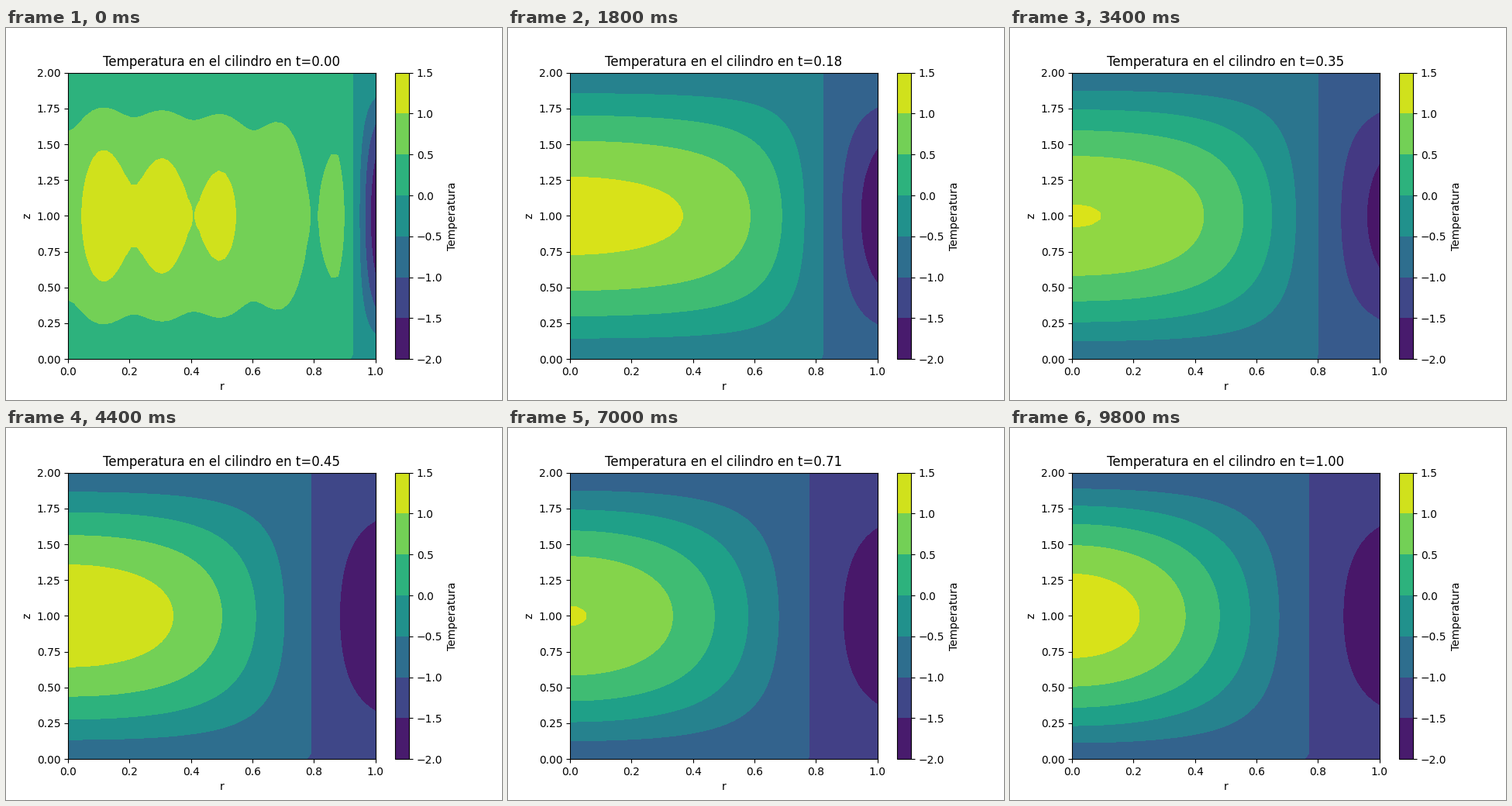
Animation of 640 by 480 pixels, one loop 10 s. Source, as a matplotlib script:

```python
import numpy as np
import matplotlib.pyplot as plt
from matplotlib.animation import FuncAnimation

FRAMES = 50
DIFFUSIVITY = 0.1
HEIGHT = 2.0
STEP = 0.01
ALPHA = np.pi * np.arange(1, 11)

r = np.linspace(0, 1, 50)
z = np.linspace(0, HEIGHT, 50)
R, Z = np.meshgrid(r, z)
times = np.linspace(0, 1, FRAMES)


def bessel_j0(x):
    theta = (np.arange(120) + 0.5) * np.pi / 120
    return np.cos(np.multiply.outer(x, np.sin(theta))).mean(axis=-1)


# Fourier-Bessel coefficients of a uniform start, by a left Riemann sum
s = np.arange(0, 1, STEP)
overlap = bessel_j0(np.outer(ALPHA, s)) @ s * STEP
amplitude = 2 * overlap / bessel_j0(ALPHA) ** 2
radial = bessel_j0(np.outer(ALPHA, r))
decay = DIFFUSIVITY * (ALPHA ** 2 + (np.pi / HEIGHT) ** 2)


def temperature(t):
    profile = (amplitude * np.exp(-decay * t)) @ radial
    return np.outer(np.sin(np.pi * z / HEIGHT), profile)


fig, ax = plt.subplots(figsize=(6.4, 4.8), dpi=100)


def draw(i):
    ax.clear()
    filled = ax.contourf(R, Z, temperature(times[i]), cmap="viridis")
    ax.set_title(f"Temperatura en el cilindro en t={times[i]:.2f}")
    ax.set_xlabel("r")
    ax.set_ylabel("z")
    return filled


fig.colorbar(draw(0), ax=ax, label="Temperatura")

anim = FuncAnimation(fig, draw, frames=FRAMES, init_func=lambda: draw(0),
                     interval=200, repeat=True, repeat_delay=0)
plt.show()
```
